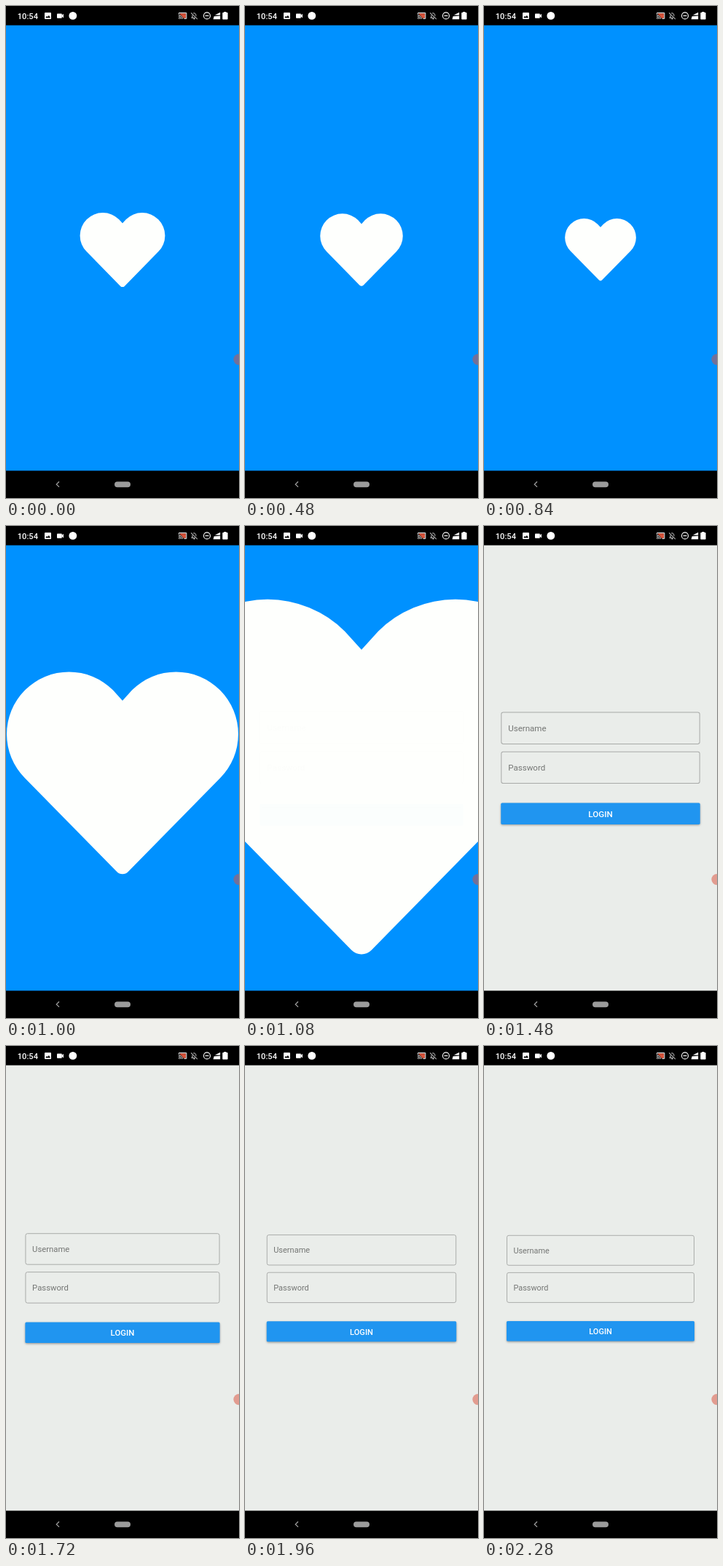
Write an HTML page with a canvas that moves like this. It is 320x676 px and loops after 4.92 s.

```html
<!DOCTYPE html>
<html lang="en">
<head>
<meta charset="utf-8">
<title>Heart splash to login</title>
<style>
  html, body { margin: 0; width: 100%; height: 100%; overflow: hidden; background: #000; }
  canvas { display: block; }
</style>
</head>
<body>
<canvas id="stage" width="320" height="676"></canvas>
<script>
const ctx = document.getElementById('stage').getContext('2d');
const LOOP = 4920, STEP = 40;
const CX = 160, CY = 332.5, TOP = 26.5, BOTTOM = 638.5;
const BLUE = '#0091ff', PAPER = '#fefffd', PAGE = '#eaedea', ACTION = '#2095f0';

// [ms, share of the transition that has run]
const PACE = [[160, 0], [480, .065], [1000, .2183], [1120, .2575], [1200, .3],
              [1480, .437], [1680, .555], [1960, .81], [2230, 1]];

function lerpPoints(points, x) {
  if (x <= points[0][0]) return points[0][1];
  for (let i = 1; i < points.length; i++) {
    const [x0, y0] = points[i - 1], [x1, y1] = points[i];
    if (x <= x1) return y0 + (y1 - y0) * (x - x0) / (x1 - x0);
  }
  return points[points.length - 1][1];
}

// cubic-bezier(.42, 0, 1, 1)
function easeIn(x) {
  let lo = 0, hi = 1;
  for (let i = 0; i < 24; i++) {
    const s = (lo + hi) / 2;
    if (1.26 * s + .48 * s * s - .74 * s * s * s < x) lo = s; else hi = s;
  }
  return 3 * lo * lo - 2 * lo * lo * lo;
}

const easeInOut = u => u < .5 ? easeIn(2 * u) / 2 : 1 - easeIn(2 - 2 * u) / 2;

function rect(x, y, w, h, color) {
  ctx.fillStyle = color;
  ctx.fillRect(x, y, w, h);
}

function roundRect(x, y, w, h, r) {
  ctx.beginPath();
  ctx.roundRect(x, y, w, h, r);
}

function disc(x, y, r, color) {
  ctx.beginPath();
  ctx.arc(x, y, r, 0, 2 * Math.PI);
  ctx.fillStyle = color;
  ctx.fill();
}

function poly(points, color) {
  ctx.beginPath();
  points.forEach(([x, y]) => ctx.lineTo(x, y));
  ctx.closePath();
  ctx.fillStyle = color;
  ctx.fill();
}

function line(points, color, width) {
  ctx.beginPath();
  points.forEach(([x, y]) => ctx.lineTo(x, y));
  ctx.strokeStyle = color;
  ctx.lineWidth = width;
  ctx.stroke();
}

function text(str, x, y, size, weight, color, align = 'left') {
  ctx.font = `${weight} ${size}px Roboto, sans-serif`;
  ctx.textAlign = align;
  ctx.fillStyle = color;
  ctx.fillText(str, x, y);
}

function heartPath(scale) {
  const q = Math.PI / 4;
  ctx.save();
  ctx.translate(CX, CY);
  ctx.scale(scale, scale);
  ctx.beginPath();
  ctx.moveTo(0, -34);
  ctx.arc(27, -17.1, 31.4, -3 * q, q);
  ctx.arcTo(0, 55.3, -49.2, 5.1, 4);
  ctx.arc(-27, -17.1, 31.4, 3 * q, 7 * q);
  ctx.closePath();
  ctx.restore();
}

function field(label, y) {
  roundRect(31.5, y, 257, 41, 2.5);
  ctx.strokeStyle = '#a8aaa8';
  ctx.lineWidth = .95;
  ctx.stroke();
  text(label, 40.4, y + 24.5, 10.9, 400, '#747674');
}

function button() {
  const x = 31, y = 377.9, w = 258, h = 27.6;
  // elevation shadow, hollow in the middle so it shows as a rim while fading in
  ctx.save();
  ctx.beginPath();
  ctx.rect(0, 300, 320, 200);
  ctx.rect(x + 2.6, y + 5.2, w - 5.2, h - 5.8);
  ctx.clip('evenodd');
  ctx.shadowColor = 'rgba(0,0,0,.36)';
  ctx.shadowBlur = 3;
  ctx.shadowOffsetX = 1000;
  ctx.shadowOffsetY = 1.2;
  const k = ctx.getTransform().a;
  roundRect(x - 1000 / k, y, w, h, 2);
  ctx.fillStyle = '#000';
  ctx.fill();
  ctx.restore();

  roundRect(x, y, w, h, 1.5);
  ctx.fillStyle = ACTION;
  ctx.fill();
  text('LOGIN', CX, 395.9, 11, 500, '#fff', 'center');
}

function login(scale, alpha) {
  ctx.save();
  ctx.globalAlpha = alpha;
  rect(0, 0, 320, 676, PAGE);
  ctx.translate(CX, CY);
  ctx.scale(scale, scale);
  ctx.translate(-CX, -CY);
  field('Username', 260.3);
  field('Password', 311.4);
  button();
  ctx.restore();
}

function castIcon() {
  rect(239, 10.3, 8, 6.4, '#d9553c');
  ctx.strokeStyle = '#fff';
  ctx.lineWidth = 1;
  ctx.beginPath();
  ctx.moveTo(237.5, 11.5);
  ctx.lineTo(237.5, 9.5);
  ctx.lineTo(247.8, 9.5);
  ctx.lineTo(247.8, 17.3);
  ctx.lineTo(244.5, 17.3);
  ctx.stroke();
  ctx.beginPath();
  ctx.moveTo(237, 17.8);
  ctx.arc(237, 17.8, 6.2, -Math.PI / 2, 0);
  ctx.closePath();
  ctx.fillStyle = '#000';
  ctx.fill();
  for (const r of [1.2, 3.2, 5.2]) {
    ctx.beginPath();
    ctx.arc(237, 17.8, r, -Math.PI / 2, 0);
    ctx.stroke();
  }
}

function bellIcon() {
  ctx.beginPath();
  ctx.moveTo(254.8, 16.2);
  ctx.lineTo(256, 15);
  ctx.lineTo(256, 12.4);
  ctx.bezierCurveTo(256, 9, 260.8, 9, 260.8, 12.4);
  ctx.lineTo(260.8, 15);
  ctx.lineTo(262, 16.2);
  ctx.closePath();
  ctx.strokeStyle = '#ddd';
  ctx.lineWidth = 1;
  ctx.stroke();
  disc(258.4, 17.6, .9, '#ddd');
  line([[254.6, 9.6], [263.4, 18.2]], '#000', 2.4);
  line([[254, 9.4], [262.8, 18]], '#fff', 1);
}

function statusBar() {
  rect(0, 0, 320, TOP, '#000');
  text('10:54', 15.8, 17.8, 11.1, 500, '#fff');

  roundRect(53, 9, 9, 9, 1);
  ctx.fillStyle = '#fff';
  ctx.fill();
  poly([[54.2, 16.2], [56, 13.7], [57.2, 15.1], [58.9, 12.8], [61, 16.2]], '#000');

  roundRect(70, 10.4, 6.8, 6.4, .8);
  ctx.fillStyle = '#fff';
  ctx.fill();
  poly([[76.4, 13.1], [79, 10.8], [79, 16.4], [76.4, 14.1]], '#fff');

  disc(91.8, 13.4, 5.4, '#fff');
  castIcon();
  bellIcon();

  ctx.beginPath();
  ctx.arc(276, 13.4, 4.5, 0, 2 * Math.PI);
  ctx.strokeStyle = '#fff';
  ctx.lineWidth = 1.1;
  ctx.stroke();
  rect(273.6, 12.8, 4.8, 1.2, '#fff');

  poly([[286.8, 12.6], [294.2, 8.8], [294.2, 12.6]], '#fff');
  poly([[284.6, 18.2], [285.6, 14.2], [294.2, 13.4], [294.2, 18.2]], '#fff');

  rect(299.2, 8, 3.4, 1.4, '#fff');
  roundRect(297.3, 9, 7.3, 9.5, .8);
  ctx.fillStyle = '#fff';
  ctx.fill();
}

function navBar() {
  rect(0, BOTTOM, 320, 676 - BOTTOM, '#000');
  line([[73, 653.5], [69.3, 657.2], [73, 660.9]], '#a8a8a8', 1.2);
  roundRect(149, 653.4, 22, 7.8, 3.9);
  ctx.fillStyle = '#9b9b9b';
  ctx.fill();
}

function draw(t) {
  const p = easeInOut(lerpPoints(PACE, t));
  const heartScale = lerpPoints([[0, 1], [.1, .8], [1, 70]], p);
  const alpha = lerpPoints([[.15, 0], [.3, 1]], p);

  rect(0, 0, 320, 676, BLUE);
  ctx.save();
  heartPath(heartScale);
  ctx.fillStyle = PAPER;
  ctx.fill();
  if (alpha > 0) {
    ctx.clip();
    login(1.1 - .1 * p, alpha);
  }
  ctx.restore();

  disc(320, 485.6, 7.6, 'rgba(218,82,62,.52)');
  statusBar();
  navBar();
}

const start = performance.now();
function tick() {
  const t = (performance.now() - start) % LOOP;
  draw(Math.floor(t / STEP) * STEP);
  requestAnimationFrame(tick);
}
tick();
</script>
</body>
</html>
```
